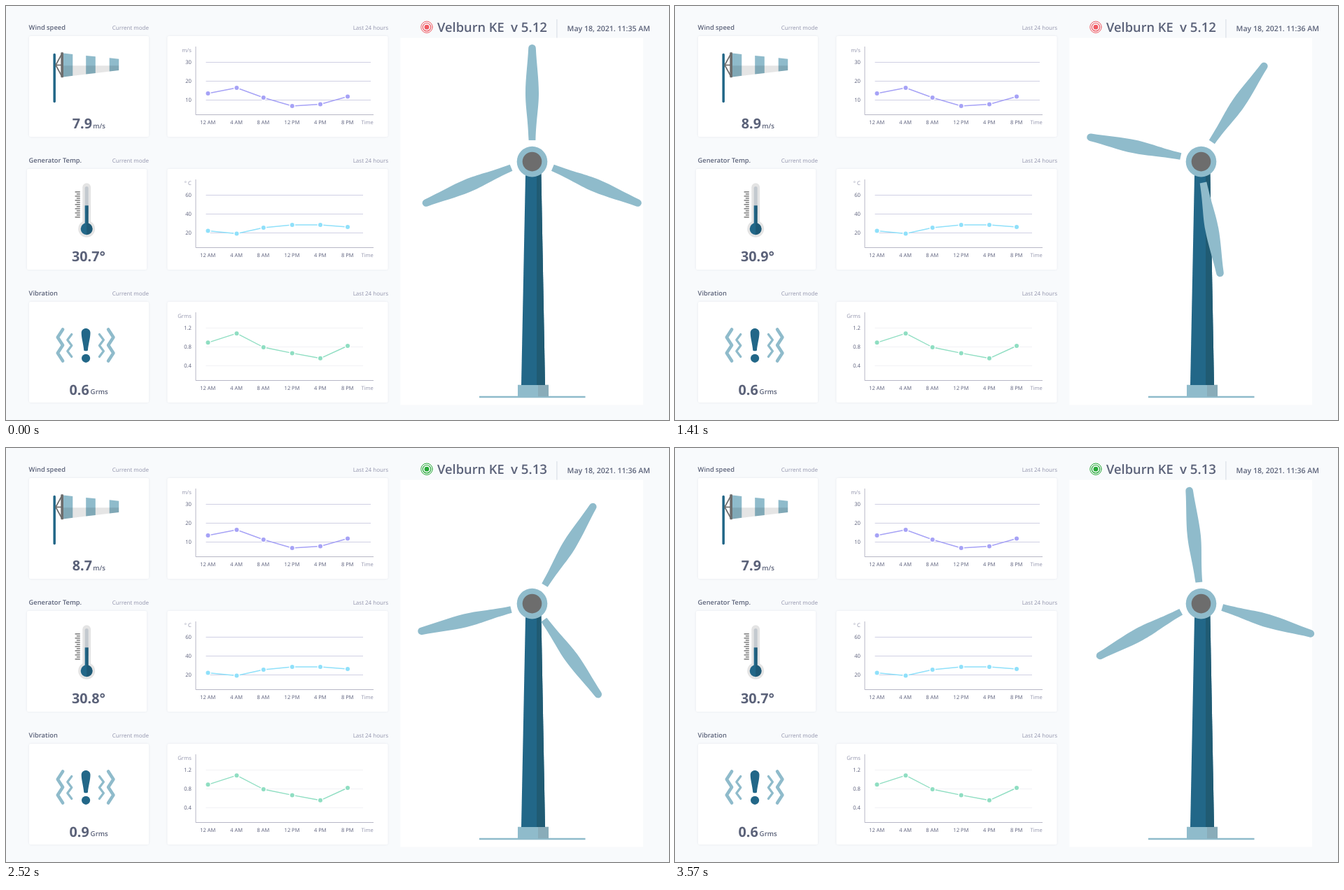
Recreate the animation shown at these times as an HTML page with a canvas. Size 947 by 592 pixels, loop 3600 ms.

```html
<!DOCTYPE html>
<html lang="en">
<head>
<meta charset="utf-8">
<title>Wind turbine dashboard</title>
<style>
html, body { margin: 0; width: 947px; height: 592px; overflow: hidden; background: #f8fafc; }
canvas { display: block; }
</style>
</head>
<body>
<canvas id="stage" width="947" height="592"></canvas>
<script>
const ctx = document.getElementById('stage').getContext('2d');
const LOOP = 3600, STEP = 30;
const SKY = '#8fbbcb', NAVY = '#226788', GRAY = '#6d6d6d', SHADE = 'rgba(0,0,0,.1)';
const INK = '#5b6279', MUTED = '#9294ac', LABEL = '#5a5e7a', AXIS = '#b7b7c6';

function text(str, x, y, size, color, weight = 400, align = 'left') {
  ctx.font = `${weight} ${size}px "Open Sans", "Noto Sans", sans-serif`;
  ctx.fillStyle = color;
  ctx.textAlign = align;
  ctx.fillText(str, x, y);
}

function rect(x, y, w, h, color, radius = 0) {
  ctx.fillStyle = color;
  ctx.beginPath();
  ctx.roundRect(x, y, w, h, radius);
  ctx.fill();
}

function disc(x, y, r, color) {
  ctx.fillStyle = color;
  ctx.beginPath();
  ctx.arc(x, y, r, 0, Math.PI * 2);
  ctx.fill();
}

function ring(x, y, r, color, width) {
  ctx.strokeStyle = color;
  ctx.lineWidth = width;
  ctx.beginPath();
  ctx.arc(x, y, r, 0, Math.PI * 2);
  ctx.stroke();
}

function trace(points) {
  ctx.beginPath();
  points.forEach(([x, y]) => ctx.lineTo(x, y));
}

function line(points, color, width, cap = 'butt') {
  trace(points);
  ctx.strokeStyle = color;
  ctx.lineWidth = width;
  ctx.lineCap = cap;
  ctx.lineJoin = 'round';
  ctx.stroke();
}

function poly(points, color) {
  trace(points);
  ctx.fillStyle = color;
  ctx.fill();
}

function card(x, y, w, h) {
  ctx.save();
  ctx.shadowColor = 'rgba(60,70,110,.1)';
  ctx.shadowBlur = 3;
  rect(x, y, w, h, '#fff', 2);
  ctx.restore();
}

const CHART_X = [288.5, 329.5, 367.8, 408.8, 449, 488];
const HOURS = ['12 AM', '4 AM', '8 AM', '12 PM', '4 PM', '8 PM'];
const ROWS = [
  { title: 'Wind speed', cardX: 33, unit: 'm/s', ticks: ['30', '20', '10'], gridEnd: 521,
    grid: '#d0d0e4', color: '#a6a2f6', values: [125, 117, 131, 143, 140.5, 129.5] },
  { title: 'Generator Temp.', cardX: 30, unit: '° C', ticks: ['60', '40', '20'], gridEnd: 510,
    grid: '#d0d0e4', color: '#8fe0fa', values: [131.5, 135.5, 127, 123, 123, 126] },
  { title: 'Vibration', cardX: 33, unit: 'Grms', ticks: ['1.2', '0.8', '0.4'], gridEnd: 510,
    grid: '#f1f1f5', color: '#8fdec2', values: [101.3, 88.2, 108, 116.4, 123.8, 106] }
];

function drawRow(row, index) {
  ctx.save();
  ctx.translate(0, index * 190);
  text(row.title, 32.6, 34.2, 9.3, INK, 600);
  text('Current mode', 204, 33.8, 8, MUTED, 400, 'right');
  text('Last 24 hours', 546, 33.8, 8, MUTED, 400, 'right');
  card(row.cardX, 43, 171, 144);
  card(230.5, 43, 315, 144);

  row.ticks.forEach((tick, i) => {
    const y = 80.5 + i * 27;
    line([[285.5, y], [row.gridEnd, y]], row.grid, 1);
    text(tick, 265, y + 2.5, 7.7, LABEL, 400, 'right');
  });
  line([[271, 58], [271, 155.5], [525, 155.5]], AXIS, 1);
  text(row.unit, 264.8, 65.5, 7.7, MUTED, 400, 'right');
  HOURS.forEach((hour, i) => text(hour, CHART_X[i] - 0.3, 169.2, 7.5, LABEL, 400, 'center'));
  text('Time', 516, 168.6, 7.5, MUTED, 400, 'center');

  const points = row.values.map((y, i) => [CHART_X[i], y]);
  line(points, row.color, 1.4);
  for (const [x, y] of points) {
    disc(x, y, 4.4, '#fff');
    disc(x, y, 3, row.color);
  }
  ctx.restore();
}

function drawWindsock() {
  line([[69.2, 69.5], [69.2, 136.5]], NAVY, 3.5, 'round');
  line([[79.5, 69], [71, 84.5], [79.5, 100]], GRAY, 1.7);
  line([[71, 84.5], [79, 84.5]], GRAY, 1.7);
  const top = x => 67.5 + (x - 81) * 0.103;
  const bottom = x => 101.5 - (x - 81) * 0.12;
  for (const [a, b] of [[82, 95.3], [114.2, 127.8], [147.7, 161.2]])
    poly([[a, top(a)], [b, top(b)], [b, bottom(b)], [a, bottom(a)]], SKY);
  poly([[82, 85.2], [161.2, 85.2], [161.2, bottom(161.2)], [82, bottom(82)]], SHADE);
  rect(78.3, 66.3, 3.7, 36, GRAY, 1);
}

function drawThermometer() {
  const x = 115.2;
  rect(x - 5.9, 253.3, 11.8, 66, '#e4e4e4', 5.9);
  disc(x, 318.8, 12, '#e4e4e4');
  rect(x - 2.5, 258, 5, 40, '#c3c9cf', 2.5);
  rect(x - 2.5, 285.3, 5, 30, NAVY);
  disc(x, 318.8, 8.5, NAVY);
  ctx.fillStyle = 'rgba(0,0,0,.13)';
  ctx.beginPath();
  ctx.arc(x, 318.8, 8.5, -Math.PI / 2, Math.PI / 2);
  ctx.fill();
  rect(x, 285.3, 2.5, 25, 'rgba(0,0,0,.13)');
  for (let i = 0; i < 13; i++)
    rect(i % 2 ? 100.8 : 98.6, 265.2 + i * 3, i % 2 ? 5 : 7.2, 1.4, GRAY);
}

function drawVibration() {
  const mid = 113.6;
  const zigzag = (side, near, far, top, bottom, width) => line(
    [0, 1, 2, 3, 4].map(i => [mid + side * (i % 2 ? far : near), top + (bottom - top) * i / 4]),
    SKY, width, 'round');
  for (const side of [-1, 1]) {
    zigzag(side, 32.5, 39.8, 462.5, 507.5, 4.6);
    zigzag(side, 19.8, 25.8, 469.5, 501.5, 3.2);
  }
  ctx.fillStyle = NAVY;
  ctx.beginPath();
  ctx.moveTo(111.3, 492.5);
  ctx.bezierCurveTo(110.6, 483, 107.7, 475, 107.7, 467.5);
  ctx.bezierCurveTo(107.7, 458.7, 120.5, 458.7, 120.5, 467.5);
  ctx.bezierCurveTo(120.5, 475, 117.6, 483, 116.9, 492.5);
  ctx.quadraticCurveTo(114.1, 494.2, 111.3, 492.5);
  ctx.fill();
  disc(114.1, 503.8, 6.1, NAVY);
}

function blade(angle, shift, reach) {
  ctx.save();
  ctx.translate(751.2, 221.5);
  ctx.rotate(angle * Math.PI / 180);
  ctx.translate(shift, -reach);
  ctx.fillStyle = SKY;
  ctx.beginPath();
  ctx.moveTo(-4.9, -29.6);
  ctx.bezierCurveTo(-6, -62, -9.5, -76, -9.5, -97);
  ctx.bezierCurveTo(-9.5, -118, -6.2, -140, -5.3, -161.2);
  ctx.arc(0, -161.2, 5.3, Math.PI, 0);
  ctx.bezierCurveTo(6.2, -140, 9.5, -118, 9.5, -97);
  ctx.bezierCurveTo(9.5, -76, 6, -62, 4.9, -29.6);
  ctx.fill();
  ctx.restore();
}

function drawTurbine(t) {
  rect(676, 557.8, 151.5, 2.4, SKY);
  rect(731, 541.8, 44, 17, SKY);
  rect(760, 541.8, 15, 16.5, 'rgba(110,110,110,.2)');
  poly([[742.2, 232], [764.3, 232], [770, 542], [736, 542]], NAVY);
  poly([[758, 232], [764.3, 232], [770, 542], [758, 542]], '#205b73');
  const turn = t * 0.2;
  blade(turn, 0.3, 0);
  blade(turn + 112.5, -2.4, 1.5);
  blade(turn - 112.5, 2.4, 1.5);
  disc(751.5, 222.6, 21.8, SKY);
  disc(751.5, 222.6, 13.8, GRAY);
}

// Number of evenly spaced ticks passed since start, limited to count.
const ticks = (t, start, gap, count) =>
  Math.max(0, Math.min(count, Math.floor((t - start) / gap) + 1));
const tenths = n => (n / 10).toFixed(1);

function drawReadings(t) {
  const wind = 79 + ticks(t, 100, 100, 10) - ticks(t, 2400, 100, 10);
  const temp = 307 + ticks(t, 600, 400, 2) - ticks(t, 2400, 400, 2);
  const shake = 6 + ticks(t, 2000, 100, 3) - ticks(t, 2700, 200, 3);
  text(tenths(wind), 94.8, 175.2, 19.8, INK, 700);
  text('m/s', 124.3, 175.2, 9.7, INK, 600);
  text(tenths(temp) + '°', 94, 365, 19.8, INK, 700);
  text(tenths(shake), 90.5, 555.7, 19.8, INK, 700);
  text('Grms', 120.6, 555.4, 9.7, INK, 600);
}

function drawHeader(t) {
  const updated = t >= 2000;
  const color = updated ? '#27a937' : '#f05a63';
  ring(601, 30.2, 8.2, color, 1);
  ring(601, 30.2, 5.7, color, 1.2);
  disc(601, 30.2, 3.4, color);
  text('Velburn KE', 616, 36.6, 18.3, INK, 600);
  text(updated ? 'v 5.13' : 'v 5.12', 721, 36.6, 18.7, INK, 600);
  rect(786.4, 19, 1, 27, '#d5dae4');
  text(`May 18, 2021. 11:${t >= 1000 ? 36 : 35} AM`, 801.6, 36.3, 10.6, INK, 600);
}

function frame(now) {
  const t = Math.floor(now % LOOP / STEP) * STEP;
  rect(0, 0, 947, 592, '#f8fafc');
  ROWS.forEach(drawRow);
  drawWindsock();
  drawThermometer();
  drawVibration();
  drawReadings(t);
  drawHeader(t);
  rect(563.5, 45.5, 346.5, 525, '#fff');
  drawTurbine(t);
  requestAnimationFrame(frame);
}

ctx.textRendering = 'geometricPrecision';
frame(0);
</script>
</body>
</html>
```
